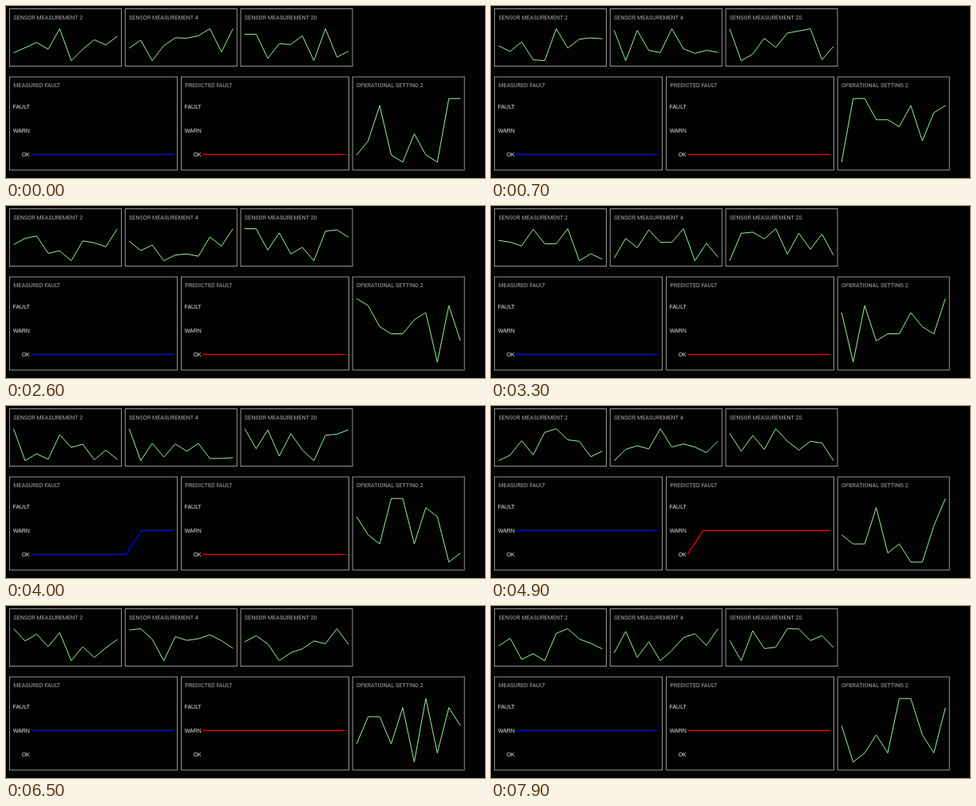
Write an HTML page that moves like this. It is 600 px wide and 216 px high and loops after 8 s.

```html
<!DOCTYPE html>
<html lang="en">
<head>
<meta charset="utf-8">
<title>Sensor dashboard</title>
<style>
  html, body { margin: 0; width: 100%; height: 100%; overflow: hidden; background: #030303; }
  svg { display: block; }
  rect { fill: none; stroke: #939393; }
  text { font: 7.2px Roboto, sans-serif; fill: #a8a8a8; }
  .level { font: 7px "Liberation Sans", Arial, sans-serif; fill: #e4e4e4; text-anchor: end; }
  polyline { fill: none; stroke: #9cee9c; stroke-linejoin: round; }
  .state { stroke-width: 1.2; }
</style>
</head>
<body>
<svg id="stage" width="600" height="216" viewBox="0 0 600 216"></svg>
<script>
const LOOP = 8000, TICK = 100, POINTS = 10, STEPS = 72;
const pauses = [14, 21, 27, 37, 62, 71, 75]; // ticks on which no sample arrives
const stage = document.getElementById('stage');
const charts = [];

function add(tag, attrs, text = '') {
  const node = document.createElementNS('http://www.w3.org/2000/svg', tag);
  for (const key in attrs) node.setAttribute(key, attrs[key]);
  node.textContent = text;
  return stage.appendChild(node);
}

function panel(title, x, y, width, height) {
  add('rect', { x, y, width, height });
  add('text', { x: x + 4.8, y: y + 13 }, title);
}

function plot(line, view, left, width, toY) {
  line.setAttribute('points', view.map((v, i) =>
    `${(left + width * i / (POINTS - 1)).toFixed(2)},${toY(v).toFixed(2)}`).join(' '));
}

function seeded(seed) {
  return () => (seed = (seed * 16807) % 2147483647) / 2147483647;
}

// Latest samples scaled to their own range; noise follows the opening samples
function trend(title, x, y, height, [top, bottom], opening, noise) {
  panel(title, x, y, 140, height);
  const line = add('polyline', {});
  const data = [...opening, ...Array.from({ length: STEPS }, noise)];
  charts.push(step => {
    const view = data.slice(step, step + POINTS);
    const low = Math.min(...view), high = Math.max(...view);
    plot(line, view, x + 5, 130, v => bottom - (v - low) / (high - low) * (bottom - top));
  });
}

function sensor(id, x, opening) {
  const random = seeded(id * 7919);
  trend('SENSOR MEASUREMENT ' + id, x, 3.5, 72, [28.5, 68.7], opening,
    () => 25 * (random() + random()));
}

function setting(id, x, opening) {
  const random = seeded(id * 104729);
  trend('OPERATIONAL SETTING ' + id, x, 89, 117, [116.2, 196], opening,
    () => Math.round(9 * random()));
}

// Fault level that rises from OK to WARN at one sample
function fault(title, x, color, rise) {
  panel(title, x, 89, 210, 117);
  ['OK', 'WARN', 'FAULT'].forEach((name, i) =>
    add('text', { class: 'level', x: x + 25.3, y: 189 - 30 * i }, name));
  const line = add('polyline', { class: 'state', style: 'stroke:' + color });
  charts.push(step => {
    const view = Array.from({ length: POINTS }, (_, i) => +(step + i >= rise));
    plot(line, view, x + 26.5, 178.5, v => 186.4 - 30 * v);
  });
}

sensor(2, 4.5, [10, 16.5, 23, 14.5, 40.5, 0, 14.5, 26.5, 20, 31]);
sensor(4, 149.3, [16, 26, 0, 19, 29, 28.5, 31.5, 40.5, 11, 40.5]);
sensor(20, 294, [33.5, 33.5, 3, 21.5, 20.5, 31.5, 0, 40.5, 4.5, 12]);
fault('MEASURED FAULT', 4.5, '#00f', 43);
fault('PREDICTED FAULT', 219.5, '#f00', 46);
setting(2, 434.2, [1, 3, 8, 1, 0, 4, 1, 0, 9, 9]);

const start = performance.now();
function draw() {
  const tick = Math.floor((performance.now() - start) % LOOP / TICK);
  const step = tick - pauses.filter(p => p <= tick).length;
  charts.forEach(update => update(step));
  requestAnimationFrame(draw);
}
draw();
</script>
</body>
</html>
```
